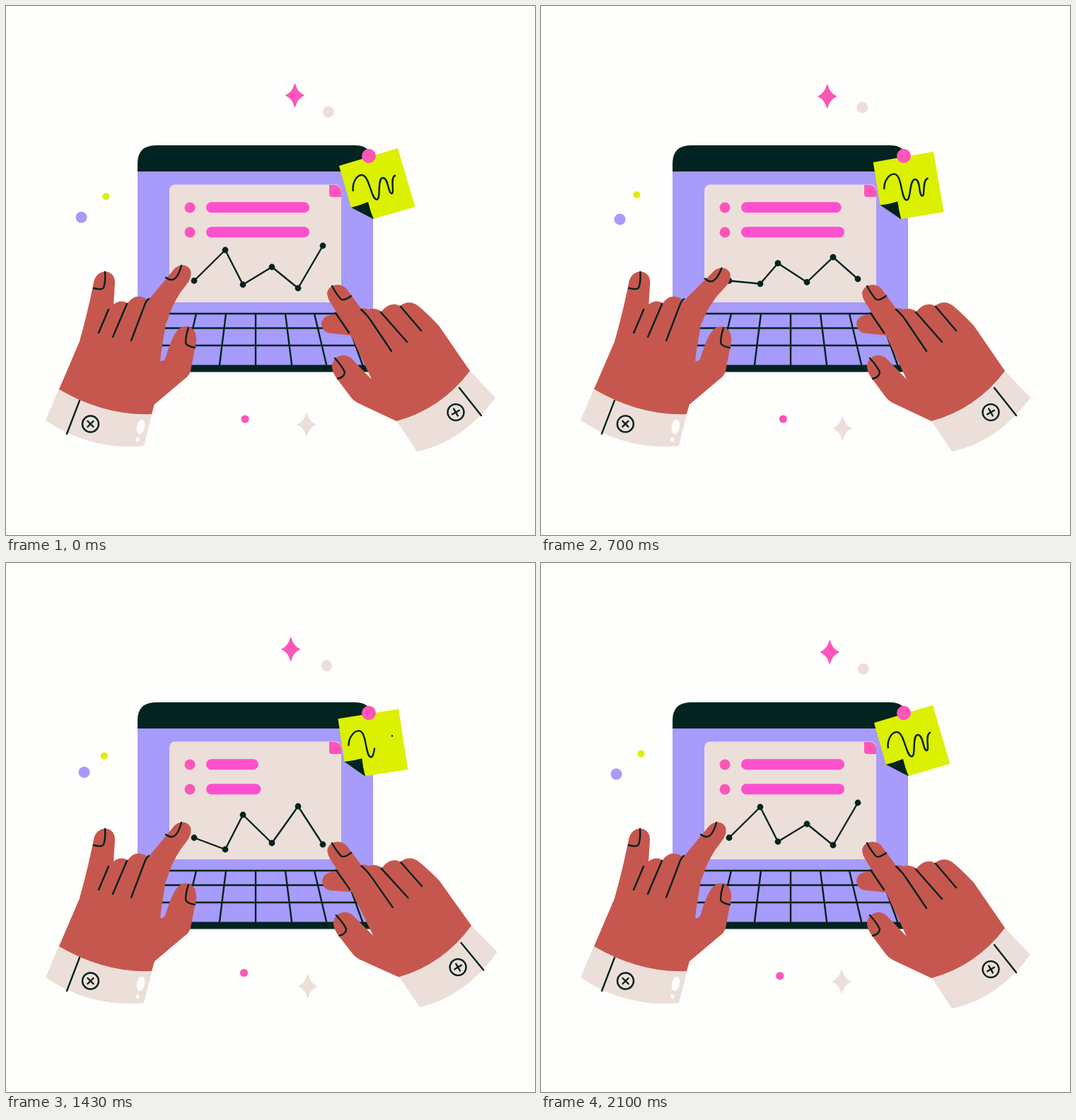
Recreate the animation shown at these times as an HTML page. Size 748 px wide and 748 px high, loop 2130 ms.

```html
<!DOCTYPE html>
<html lang="en">
<head>
<meta charset="utf-8">
<title>Typing on a laptop</title>
<style>
  html, body { margin: 0; width: 100%; height: 100%; overflow: hidden; background: #fefefc; }
  svg { display: block; width: 100vw; height: 100vh; }
  .dark { fill: #02231f; }
  .purple { fill: #a79bfb; }
  .cream { fill: #ecdfd9; }
  .pink { fill: #fd55b9; }
  .bar { fill: #fd50cf; }
  .yellow { fill: #dcf002; }
  .skin { fill: #c6574e; }
  .white { fill: #fefefc; }
  .ink { fill: none; stroke: #02231f; stroke-width: 2.4; stroke-linecap: round; stroke-linejoin: round; }
</style>
</head>
<body>
<svg viewBox="0 0 748 748">
  <defs>
    <path id="star" d="M0-16Q3-4 12.5 0Q3 4 0 16Q-3 4-12.5 0Q-3-4 0-16Z" stroke-width="1.5" stroke-linejoin="round"/>
    <g id="button" class="ink">
      <circle r="11.5"/>
      <path d="M-4-4L4 4M4-4L-4 4"/>
    </g>
  </defs>

  <!-- laptop -->
  <path class="purple" d="M186 230H519V510H186Z"/>
  <path class="dark" d="M186 234V223Q186 197 212 197H493Q519 197 519 223V234ZM186 507.5H519V517.5H186Z"/>
  <rect class="cream" x="231" y="252.5" width="243" height="166.5" rx="8"/>
  <path class="pink" d="M457 253H465Q474 254 474 263V270H461Q457 270 457 266Z"/>
  <circle class="pink" cx="260" cy="285" r="7.5"/>
  <circle class="pink" cx="260" cy="320" r="7.5"/>
  <rect class="bar" id="bar1" x="283" y="277.3" height="15" rx="7.5"/>
  <rect class="bar" id="bar2" x="283" y="312.3" height="15" rx="7.5"/>
  <path class="ink" d="M222 435H500M200 455.5H510M190 480H515M269 435L252 507M311 435L302 507M353 435V507M395 435L404 507M436 435L453 507M478 435L504 507"/>
  <polyline class="ink" id="graph"/>
  <g class="dark" id="knots"></g>

  <!-- floating bits -->
  <g id="bits">
    <use href="#star" class="pink" stroke="#fd55b9"/>
    <circle class="cream" r="8"/>
    <circle class="yellow" r="5"/>
    <circle class="purple" r="8"/>
    <circle class="pink" r="5.6"/>
    <use href="#star" class="cream" stroke="#ecdfd9"/>
  </g>

  <!-- sticky note -->
  <g id="note">
    <path class="yellow" d="M471 226L554 201L578.500 284L520 301L488 285Z"/>
    <path class="dark" d="M488 285Q501 282 512 277Q515 290 520 301.5Z"/>
    <path class="ink" id="scribble" pathLength="1" style="stroke-linecap:butt" d="M491 262C489 250 496 239 503 239C514 239 516 273 524 273.500C531 274 524 243 533 243C541 243 540 265 545.500 265C550 265 542 241 551 239.500"/>
  </g>
  <circle class="pink" cx="513" cy="212" r="10"/>

  <!-- left hand -->
  <g id="left">
    <path class="cream" d="M75 541L56 586Q120 629 195 622L207 575Z"/>
    <g id="pinky">
      <path class="skin" d="M104 474Q114 440 124 391C128 370 154 371 154 391L151 440Z"/>
      <path class="ink" d="M140 376Q141 390 138 398Q136 402 124 399"/>
    </g>
    <g id="thumb">
      <path class="skin" d="M205 500L218 502Q224 503 226 496C231 480 236 466 243 458Q250 451 260 454Q270 459 269 474L261 516Q259 523 253 527L210 563Z"/>
      <path class="ink" d="M258 455Q254 466 254 476Q255 481 267 483"/>
    </g>
    <path class="skin" d="M75 542L105 472L116 430L152 422Q162 414 172 420Q181 408 192 411.500Q200 413 204 420L225 428C230 442 221 470 218 503L230 546L210 563L206 577Q140 580 75 542Z"/>
    <g id="index">
      <path class="skin" d="M198 424Q201 415 207 409L236 374C243 364 257 364 261 374Q263 382 258 390L246 406Q235 424 231 436Q225 460 210 459Q196 450 198 424Z"/>
      <path class="ink" d="M226 384Q233 389 238 386Q244 382 248 367"/>
    </g>
    <path class="ink" d="M145 429L131 462M171 421L151 468M177 473L196 423Q198 417 202 414M104 558L86 605"/>
    <use href="#button" x="119.500" y="591"/>
    <ellipse class="white" rx="5.500" ry="10.500" transform="translate(190.500 595) rotate(12)"/>
    <ellipse class="white" cx="186" cy="613" rx="2.500" ry="3.200"/>
  </g>

  <!-- right hand -->
  <g id="right">
    <path class="cream" d="M656 516L692 554Q645 617 581 630L552 586Z"/>
    <path class="skin" id="middle" d="M474 436H462Q447 438 446 450Q448 463 462 463L490 466L504 450Z"/>
    <path class="skin" d="M656 516L612 452Q597 436 584 425Q571 414 557 424Q543 417 531 432Q522 426 512 429Q506 426 502 428L483 402C476 390 455 392 454 407Q455 414 459 420L488 466L517 528L489 499C478 488 460 496 461 511Q462 519 468 527L486 551Q490 557 497 561L552 587Q615 570 656 516Z"/>
    <path class="ink" d="M461 396Q467 407 473 414Q477 418 488 410M465 498Q476 510 479 518Q478 525 469 527M466 434L485 462M502 429Q510 436 516 445L545 488M530 433L567 475M558 425L587 459M641 540L672 579"/>
    <use href="#button" transform="translate(636 574.500) rotate(15)"/>
  </g>
</svg>
<script>
  const LOOP = 2130, FRAME = 100 / 3;
  const $ = id => document.getElementById(id);
  const smooth = u => (u = Math.min(1, Math.max(0, u)), u * u * (3 - 2 * u));
  const bump = (t, mid, half) => 1 - smooth(Math.abs(t - mid) / half);
  const turn = (id, deg, x, y) => $(id).setAttribute('transform', `rotate(${deg} ${x} ${y})`);

  // chart points: x, first height, second height
  const chart = [[266, 388.5, 388.5], [310, 345, 405], [335, 394, 356], [376, 369, 396], [413, 399, 344], [448, 339, 398]];
  const knots = chart.map(([x]) => {
    const dot = document.createElementNS('http://www.w3.org/2000/svg', 'circle');
    dot.setAttribute('cx', x);
    dot.setAttribute('r', 4.4);
    return $('knots').appendChild(dot);
  });

  // drifting orbits: centre x, radius, phase; centre y, radius, phase (cosines, degrees)
  const orbits = [
    [405.2, 3.4, -20, 125.3, 3.5, -72],
    [454.5, 1.5, -25, 146.2, 3.8, 15],
    [138.5, 3.5, 35, 269.7, 3.2, 96],
    [109.6, 3.1, 190, 298.8, 3.3, -90],
    [339, 3.5, -105, 582.5, 3, -58],
    [426, 1, 170, 595.9, 4.1, 170]
  ];

  function draw(t) {
    const angle = t / (64 * FRAME) * 360;
    const wave = phase => Math.cos((angle + phase) * Math.PI / 180);

    [...$('bits').children].forEach((bit, i) => {
      const [x, rx, px, y, ry, py] = orbits[i];
      bit.setAttribute('transform', `translate(${x + rx * wave(px)} ${y + ry * wave(py)})`);
    });

    const barWidth = (a, b) => 146 - 73 * (bump(t, a, 310) + bump(t, b, 310));
    $('bar1').setAttribute('width', barWidth(436, 1453));
    $('bar2').setAttribute('width', barWidth(376, 1387));

    const mix = smooth((t - 487) / 300) - smooth((t - 1493) / 300);
    const points = chart.map(([x, a, b]) => [x, a + (b - a) * mix]);
    $('graph').setAttribute('points', points.join(' '));
    points.forEach(([, y], i) => knots[i].setAttribute('cy', y));

    turn('note', 4.9 * (1 - wave(-6)), 513, 212);
    const s = t - (t < 1060 ? 80 : 1125);
    const wiped = smooth(s / 330), redrawn = smooth((s - 135) / 330);
    $('scribble').setAttribute('stroke-dasharray', [redrawn, wiped - redrawn, 1 - wiped, 1].join(' '));

    const tilt = bump(t, 469, 245);
    turn('left', 14.3 * tilt, 155, 533);
    turn('pinky', -6 * tilt, 130, 455);
    turn('thumb', -8 * tilt, 222, 535);
    turn('index', 38 * bump(t, 540, 210), 215, 442);
    turn('right', 0.35 * bump(t, 1190, 110) - bump(t, 1420, 200) + 0.75 * bump(t, 1667, 220), 467, 394);
    turn('middle', -13 * bump(t, 1600, 190), 492, 452);
  }

  const start = performance.now();
  function tick() {
    const t = (performance.now() - start) % LOOP;
    draw(Math.floor((t + 5) / FRAME) * FRAME); // 30 poses a second
    requestAnimationFrame(tick);
  }
  tick();
</script>
</body>
</html>
```
